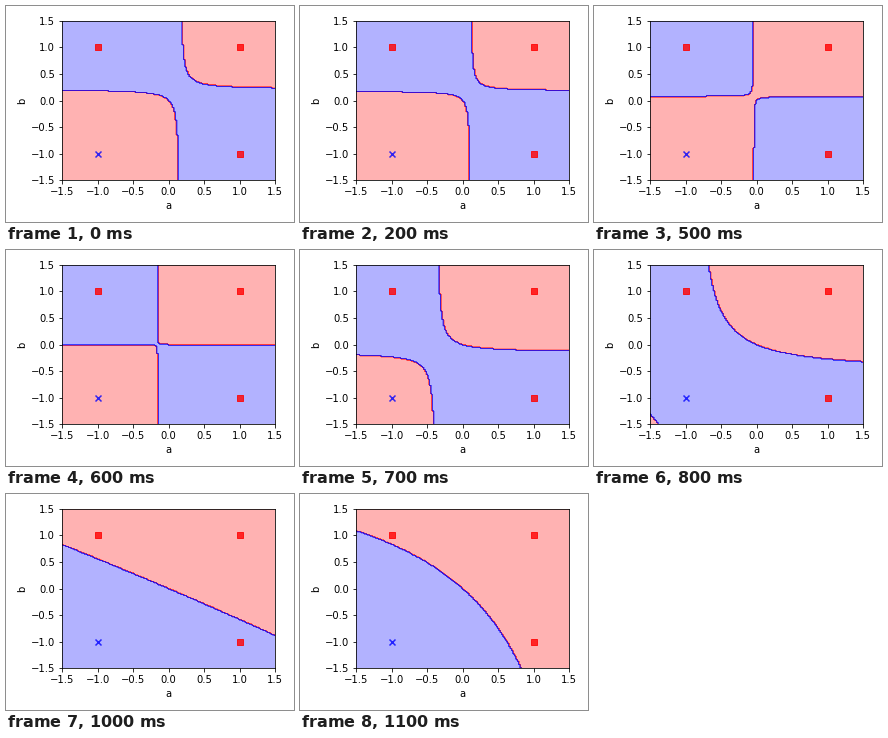
Recreate the animation shown at these times as a matplotlib script. Size 288 by 216 pixels, loop 1200 ms.

```python
import matplotlib.pyplot as plt
import numpy as np
from matplotlib.animation import FuncAnimation
from matplotlib.colors import ListedColormap

EPOCHS = 12
LIMIT = 1.5
COLORS = ("red", "blue")
MARKERS = ("s", "x")

POINTS = np.array([(-1, -1), (-1, 1), (1, -1), (1, 1)])
LABELS = np.array([-1, 1, 1, 1])
START = np.array([-5.97, -4.44, 27.92])


def features(a, b):
    return np.stack([a, b, a * b], axis=-1)


def train(weights, steps):
    """Batch perceptron: weights after each epoch."""
    inputs = features(*POINTS.T)
    history = [weights]
    for _ in range(steps - 1):
        wrong = LABELS * (inputs @ weights) <= 0
        weights = weights + LABELS[wrong] @ inputs[wrong]
        history.append(weights)
    return history


HISTORY = train(START, EPOCHS)
axis = np.arange(-2, 2, 0.02)
GRID_A, GRID_B = np.meshgrid(axis, axis)
GRID = features(GRID_A, GRID_B)

fig, ax = plt.subplots(figsize=(4, 3), dpi=72)


def draw(epoch):
    ax.clear()
    regions = np.where(GRID @ HISTORY[epoch] > 0, -1, 1)
    ax.contourf(GRID_A, GRID_B, regions, alpha=0.3,
                cmap=ListedColormap(COLORS))
    for label, color, marker in zip((1, -1), COLORS, MARKERS):
        a, b = POINTS[LABELS == label].T
        ax.scatter(a, b, color=color, marker=marker, alpha=0.8)
    ax.set(xlim=(-LIMIT, LIMIT), ylim=(-LIMIT, LIMIT), xlabel="a", ylabel="b")
    ticks = np.arange(-LIMIT, LIMIT + 0.1, 0.5)
    ax.set_xticks(ticks)
    ax.set_yticks(ticks)
    return ax.get_children()


draw(0)
fig.tight_layout()
anim = FuncAnimation(fig, draw, frames=EPOCHS, init_func=lambda: [],
                     interval=100, repeat=True, repeat_delay=0)
plt.show()
```
